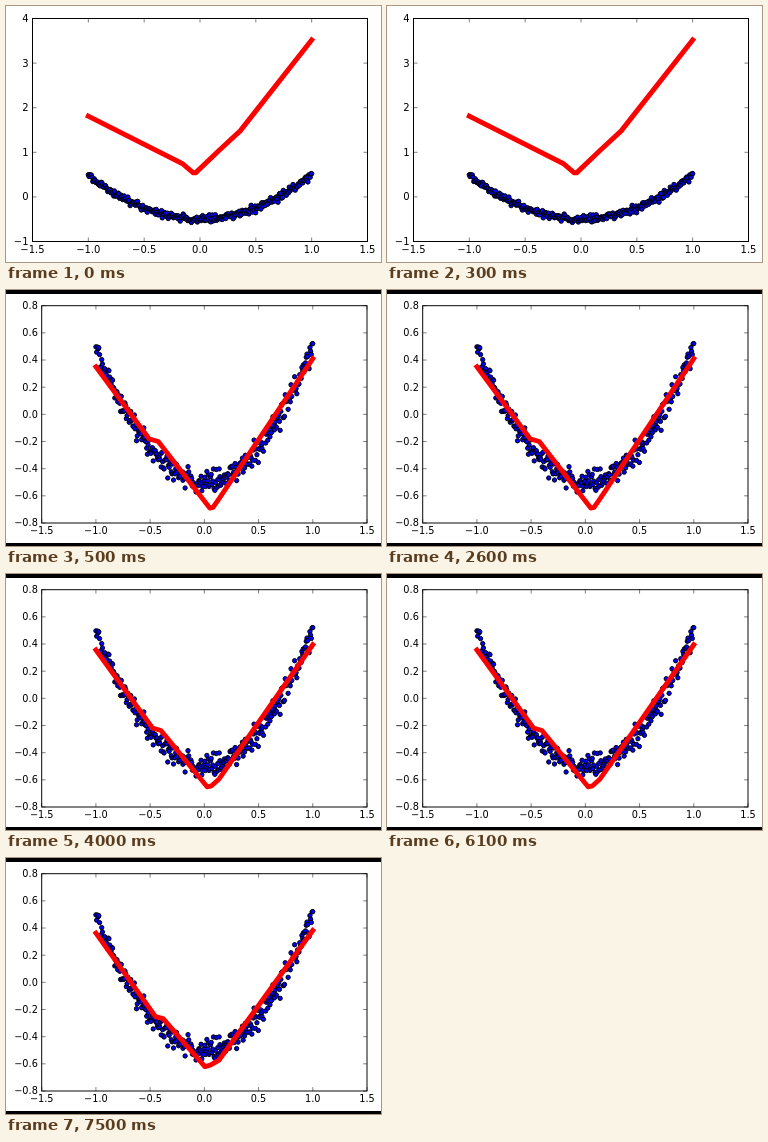
An HTML page with a canvas that plays this animation: 375x256 px, repeating every 8000 ms.

```html
<!DOCTYPE html>
<html lang="en">
<head>
<meta charset="utf-8">
<title>Curve fitting</title>
<style>
  html, body { margin: 0; width: 100%; height: 100%; overflow: hidden; background: #fff; }
  canvas { display: block; }
</style>
</head>
<body>
<canvas id="stage" width="375" height="256"></canvas>
<script>
const W = 375, H = 256, LOOP = 8000, COUNT = 300;
const ctx = document.getElementById('stage').getContext('2d');

// Axes box in pixels, range and tick step of y, scale of the details
const wide = { left: 26.5, top: 12.5, right: 361.5, bottom: 235.5, lo: -1, hi: 4, step: 1, digits: 0, scale: 1 };
const close = { left: 35.7, top: 15.7, right: 361, bottom: 233, lo: -0.8, hi: 0.8, step: 0.2, digits: 1, scale: 0.972, bars: true };

// Bends of the fitted curve: untrained, early and late in training
const untrained = [[-1, 1.81], [-0.16, 0.75], [-0.06, 0.54], [-0.04, 0.54], [0.17, 1.04], [0.36, 1.48], [1, 3.52]];
const early = [[-1, 0.35], [-0.51, -0.18], [-0.425, -0.2], [0.05, -0.69], [0.08, -0.685], [0.136, -0.62], [1, 0.41]];
const late = [[-1, 0.362], [-0.45, -0.252], [-0.38, -0.267], [0.005, -0.62], [0.055, -0.61], [0.136, -0.572], [1, 0.382]];

const mix = (a, b, p) => a + (b - a) * p;
const trained = p => early.map(([x, y], i) => [mix(x, late[i][0], p), mix(y, late[i][1], p)]);

const stages = [
  { at: 0, axes: wide, fit: untrained },
  { at: 500, axes: close, fit: trained(0) },
  { at: 4000, axes: close, fit: trained(0.55) },
  { at: 7500, axes: close, fit: trained(1) }
];

function seeded(seed) {
  return () => {
    seed = (seed + 0x6D2B79F5) | 0;
    let t = Math.imul(seed ^ (seed >>> 15), 1 | seed);
    t = (t + Math.imul(t ^ (t >>> 7), 61 | t)) ^ t;
    return ((t ^ (t >>> 14)) >>> 0) / 4294967296;
  };
}

// A parabola with roughly normal noise
const rand = seeded(12);
const points = Array.from({ length: COUNT }, (_, i) => {
  const x = mix(-1, 1, i / (COUNT - 1));
  const noise = (rand() + rand() + rand() + rand() - 2) * 0.068;
  return [x, x * x - 0.495 + noise];
});

const toX = (a, x) => mix(a.left, a.right, (x + 1.5) / 3);
const toY = (a, y) => mix(a.bottom, a.top, (y - a.lo) / (a.hi - a.lo));

function label(v, digits) {
  const text = Math.abs(v).toFixed(digits);
  return v < -0.01 ? '\u2212' + text : text;
}

function segment(x, y, dx, dy) {
  ctx.beginPath();
  ctx.moveTo(x, y);
  ctx.lineTo(x + dx, y + dy);
  ctx.stroke();
}

function drawAxes(a) {
  const tick = 4 * a.scale;
  ctx.strokeStyle = ctx.fillStyle = '#000';
  ctx.lineCap = 'butt';
  ctx.lineJoin = 'miter';
  ctx.lineWidth = a.scale;
  ctx.strokeRect(a.left, a.top, a.right - a.left, a.bottom - a.top);
  ctx.lineWidth = 0.5;
  ctx.font = `${10 * a.scale}px "DejaVu Sans", sans-serif`;
  ctx.textAlign = 'center';
  for (let i = -3; i <= 3; i++) {
    const v = i / 2, x = toX(a, v);
    segment(x, a.top, 0, tick);
    segment(x, a.bottom, 0, -tick);
    ctx.fillText(label(v, 1), x, a.bottom + 11.5 * a.scale);
  }
  ctx.textAlign = 'right';
  const rows = Math.round((a.hi - a.lo) / a.step);
  for (let i = 0; i <= rows; i++) {
    const v = a.lo + i * a.step, y = toY(a, v);
    segment(a.left, y, tick, 0);
    segment(a.right, y, -tick, 0);
    ctx.fillText(label(v, a.digits), a.left - tick, y + 3.5 * a.scale);
  }
}

function drawPoints(a) {
  ctx.fillStyle = '#00f';
  ctx.strokeStyle = '#000';
  ctx.lineWidth = a.scale;
  for (const [x, y] of points) {
    ctx.beginPath();
    ctx.arc(toX(a, x), toY(a, y), 2.236 * a.scale, 0, 2 * Math.PI);
    ctx.fill();
    ctx.stroke();
  }
}

function drawFit(a, fit) {
  ctx.strokeStyle = '#f00';
  ctx.lineWidth = 5 * a.scale;
  ctx.lineCap = 'square';
  ctx.lineJoin = 'round';
  ctx.beginPath();
  for (const [x, y] of fit) ctx.lineTo(toX(a, x), toY(a, y));
  ctx.stroke();
}

function draw(t) {
  const { axes, fit } = stages.filter(s => s.at <= t).pop();
  ctx.fillStyle = '#fff';
  ctx.fillRect(0, 0, W, H);
  if (axes.bars) {
    ctx.fillStyle = '#000';
    ctx.fillRect(0, 0, W, 4);
    ctx.fillRect(0, H - 3, W, 3);
  }
  drawPoints(axes);
  drawFit(axes, fit);
  drawAxes(axes);
}

const start = performance.now();
function loop() {
  draw((performance.now() - start) % LOOP);
  requestAnimationFrame(loop);
}
loop();
</script>
</body>
</html>
```
